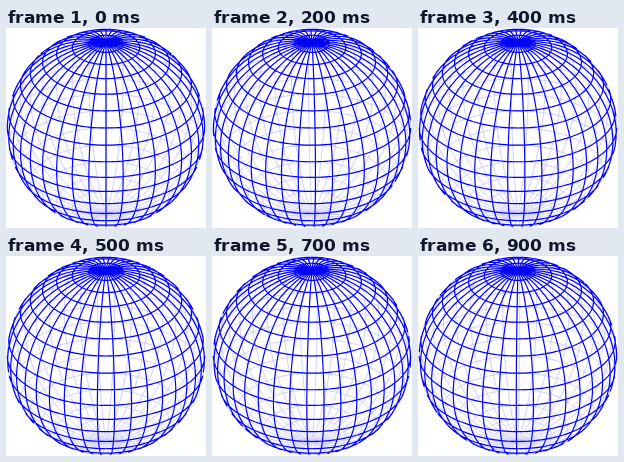
An HTML page with a canvas that plays this animation: 200 px wide and 200 px high, repeating every 1000 ms.

```html
<!DOCTYPE html>
<html>
<head>
<meta charset="utf-8">
<style>
html, body { margin: 0; width: 100%; height: 100%; overflow: hidden; background: #fff; }
canvas { display: block; width: 200px; height: 200px; }
</style>
</head>
<body>
<canvas id="stage" width="200" height="200"></canvas>
<script>
const ctx = document.getElementById('stage').getContext('2d');
const RAD = Math.PI / 180;
const R = 98.7, C = 100, STEP = 10;
const tiltSin = Math.sin(30 * RAD), tiltCos = Math.cos(30 * RAD);

function project(lat, lon) {
  const ring = Math.cos(lat * RAD);
  const x = ring * Math.sin(lon * RAD);
  const y = Math.sin(lat * RAD);
  const z = ring * Math.cos(lon * RAD);
  return {
    x: C + R * x,
    y: C - R * (y * tiltCos - z * tiltSin),
    depth: y * tiltSin + z * tiltCos
  };
}

// Adds the part of a curve that lies on one side of the sphere.
function addCurve(point, from, to, side) {
  let prev = null, joined = false;
  for (let a = from; a <= to; a += 2) {
    const p = project(...point(a));
    if (prev && (prev.depth + p.depth) * side >= 0) {
      if (!joined) ctx.moveTo(prev.x, prev.y);
      ctx.lineTo(p.x, p.y);
      joined = true;
    } else {
      joined = false;
    }
    prev = p;
  }
}

function drawSide(side, spin, color, width) {
  ctx.beginPath();
  for (let lon = 0; lon < 360; lon += STEP)
    addCurve(a => [a, lon + spin], -90, 90, side);
  for (let lat = -80; lat <= 80; lat += STEP)
    addCurve(a => [lat, a], 0, 360, side);
  ctx.strokeStyle = color;
  ctx.lineWidth = width;
  ctx.stroke();
}

function frame() {
  // One degree every 100 ms; ten degrees bring the grid back to its start.
  const spin = Math.floor(performance.now() % 1000 / 100);
  ctx.fillStyle = '#fff';
  ctx.fillRect(0, 0, 200, 200);
  drawSide(-1, spin, '#c4c4ff', 0.8);
  drawSide(1, spin, '#00f', 1.2);
  requestAnimationFrame(frame);
}
frame();
</script>
</body>
</html>
```
